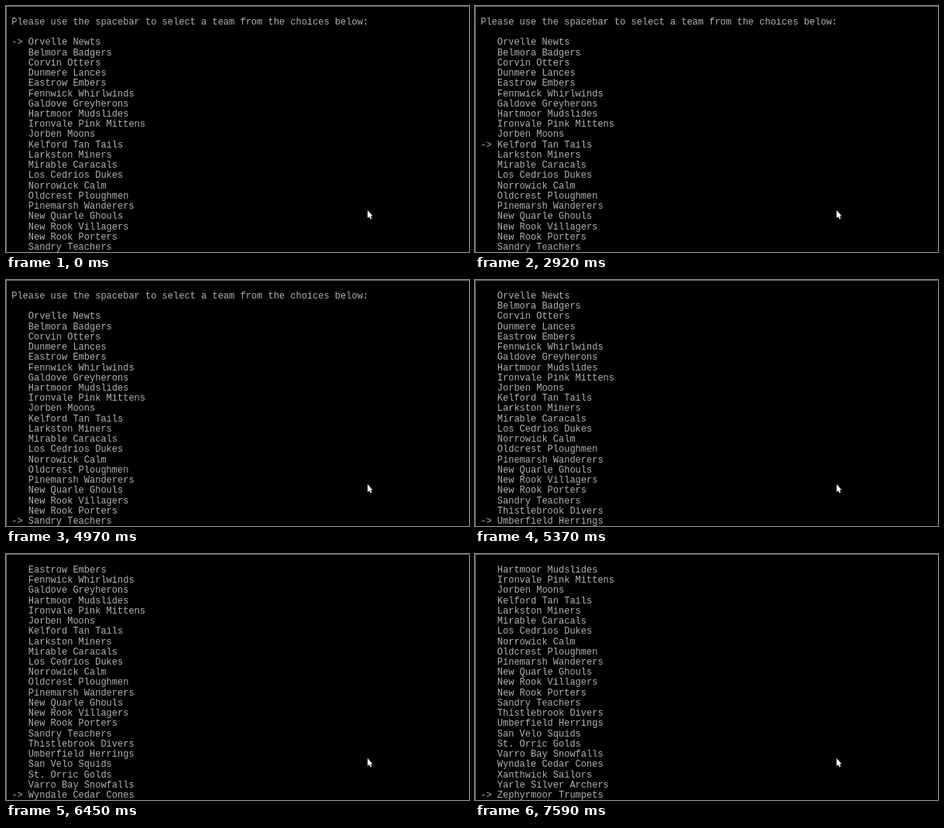
An HTML page for the animation above (7990 ms loop, 598x318 px).

```html
<!DOCTYPE html>
<html lang="en">
<head>
<meta charset="utf-8">
<title>Team menu</title>
<style>
  html, body { margin: 0; width: 100%; height: 100%; overflow: hidden; background: #000; }
  svg { display: block; }
  text {
    font: 12px "Courier New", "Liberation Mono", monospace;
    fill: #b2b2b2;
    white-space: pre;
  }
</style>
</head>
<body>
<svg id="stage" width="598" height="318" viewBox="0 0 598 318">
  <rect width="598" height="318" fill="#000"/>
  <path d="M0 .5H598M.5 0V318" stroke="#686868"/>
  <g id="lines"></g>
  <path d="M467 264V274L469.2 272.2L470.8 275.4L472.4 274.6L470.9 271.5H473.6Z" fill="#fff"/>
</svg>
<script>
const PROMPT = "Please use the spacebar to select a team from the choices below:";
const TEAMS = [
  "Orvelle Newts", "Belmora Badgers", "Corvin Otters", "Dunmere Lances",
  "Eastrow Embers", "Fennwick Whirlwinds", "Galdove Greyherons",
  "Hartmoor Mudslides", "Ironvale Pink Mittens", "Jorben Moons",
  "Kelford Tan Tails", "Larkston Miners", "Mirable Caracals",
  "Los Cedrios Dukes", "Norrowick Calm", "Oldcrest Ploughmen",
  "Pinemarsh Wanderers", "New Quarle Ghouls", "New Rook Villagers",
  "New Rook Porters", "Sandry Teachers", "Thistlebrook Divers",
  "Umberfield Herrings", "San Velo Squids", "St. Orric Golds",
  "Varro Bay Snowfalls", "Wyndale Cedar Cones", "Xanthwick Sailors",
  "Yarle Silver Archers", "Zephyrmoor Trumpets"
];

const LOOP = 7990;
const ROWS = 23;
const PITCH = 13.227;
const HEADER = 2; // prompt and blank line above the list

// Key press times; the first press jumps two entries, the rest one each.
const PRESSES = [
  680, 1110, 1640, 1760, 2060, 2180, 2460, 2610, 2920, 3040, 3340, 3490, 3740,
  3890, 4040, 4420, 4570, 4850, 4970, 5090, 5370, 5520, 5770, 6040, 6450, 6730,
  7030, 7590
];

const group = document.getElementById("lines");
const rows = Array.from({ length: ROWS }, (_, i) => {
  const row = document.createElementNS("http://www.w3.org/2000/svg", "text");
  row.setAttribute("x", 7.2);
  row.setAttribute("y", Math.round(24 + i * PITCH));
  return group.appendChild(row);
});

function selectedAt(time) {
  const count = PRESSES.filter(t => t <= time).length;
  return count ? count + 1 : 0;
}

function lineText(line, selected) {
  if (line === 0) return PROMPT;
  const team = line - HEADER;
  if (team < 0 || team >= TEAMS.length) return "";
  return (team === selected ? "-> " : "   ") + TEAMS[team];
}

let shown = -1;

function draw(selected) {
  const scroll = Math.max(0, selected + HEADER - (ROWS - 1));
  rows.forEach((row, i) => {
    row.textContent = lineText(i + scroll, selected);
  });
  shown = selected;
}

const start = performance.now();

function tick() {
  const selected = selectedAt((performance.now() - start) % LOOP);
  if (selected !== shown) draw(selected);
  requestAnimationFrame(tick);
}

tick();
</script>
</body>
</html>
```
